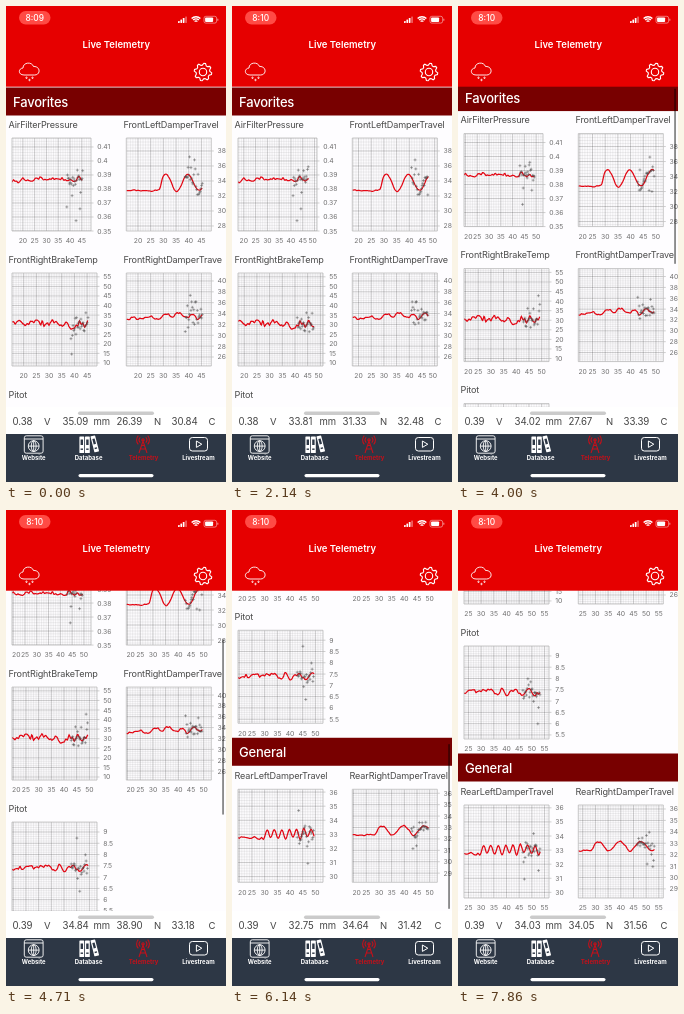
Recreate the animation shown at these times as an HTML page with a canvas. Size 220x476 px, loop 8 s.

```html
<!DOCTYPE html>
<html lang="en">
<head>
<meta charset="utf-8">
<title>Live Telemetry</title>
<style>
  html, body { margin: 0; width: 100%; height: 100%; overflow: hidden; background: #fff; }
  canvas { display: block; width: 220px; height: 476px; }
</style>
</head>
<body>
<canvas id="stage"></canvas>
<script>
const W = 220, H = 476, LOOP = 8000, FPS = 7;
const TOP = 80, SHEET = 401, TABS = 428, MAX_SCROLL = 266, OVERSHOOT = 16;
const BOX_H = 93, SPAN = 33.5, HISTORY = 30, RECENT = 6.8;
const FONT = 'Inter, "Liberation Sans", sans-serif';
const canvas = document.getElementById('stage');
const c = canvas.getContext('2d');
const dpr = window.devicePixelRatio || 1;
canvas.width = W * dpr;
canvas.height = H * dpr;

// amp and period describe the swing after the car starts moving; rough is noise as a share of the range
const charts = [
  { name: 'AirFilterPressure', row: 0, col: 0, w: 79, min: .35, max: .4164, step: .01, base: .3866, rough: .07 },
  { name: 'FrontLeftDamperTravel', row: 0, col: 1, min: 27.33, max: 39.73, step: 2, base: 32.7, amp: 2.2, period: 8.7 },
  { name: 'FrontRightBrakeTemp', row: 1, col: 0, min: 8.4, max: 57, step: 5, base: 31, rough: .15 },
  { name: 'FrontRightDamperTrave', row: 1, col: 1, min: 24.34, max: 41.47, step: 2, base: 33.2, amp: .7, period: 5, rough: .05 },
  { name: 'Pitot', row: 2, col: 0, min: 5.32, max: 9.44, step: .5, base: 7.4, rough: .1 },
  { name: 'RearLeftDamperTravel', row: 3, col: 0, min: 29.6, max: 36.2, step: 1, base: 32.75, amp: .6, period: 2.9, rough: .06 },
  { name: 'RearRightDamperTravel', row: 3, col: 1, min: 28.2, max: 36.35, step: 1, base: 32.35, amp: .8, period: 8.5 }
].map((ch, id) => ({
  amp: 0, period: 1, rough: .025, w: 85, ...ch, id,
  x: ch.col ? 120.3 : 6,
  y: 132 + ch.row * 135 + (ch.row > 2 ? 24 : 0)
}));

const readouts = [
  { unit: 'V', x: 6.5, ux: 38, start: .38, swing: .02 },
  { unit: 'mm', x: 56.5, ux: 87.5, start: 35.09, swing: -3 },
  { unit: 'N', x: 110.5, ux: 148, start: 26.39, swing: 14 },
  { unit: 'C', x: 165.5, ux: 202.5, start: 30.84, swing: 3 }
];

const hash = n => { const v = Math.sin(n * 127.1) * 43758.5453; return v - Math.floor(v); };
const gauss = n => (hash(n) + hash(n + .37) + hash(n + .71) - 1.5) * 2;
const ease = u => { u = Math.min(1, Math.max(0, u)); return u * u * (3 - 2 * u); };

function smoothNoise(x) {
  const i = Math.floor(x);
  return hash(i) + (hash(i + 1) - hash(i)) * ease(x - i) - .5;
}

const scrollAt = t => (MAX_SCROLL + OVERSHOOT) * ease((t - 3.825) / 2.36) - OVERSHOOT * ease((t - 6.19) / .6);

// plots pause while the list is being dragged
const newestAt = t => 45.4 + (t > 4.1 && t < 6.4 ? 4.1 : t);

function text(s, x, y, size, color, { align = 'left', weight = 400, track = 0 } = {}) {
  c.font = `${weight} ${size}px ${FONT}`;
  c.letterSpacing = track + 'px';
  c.textAlign = align;
  c.fillStyle = color;
  c.fillText(s, x, y);
}
function rect(x, y, w, h, color) { c.fillStyle = color; c.fillRect(x, y, w, h); }
function pill(x, y, w, h, r, color) {
  c.beginPath(); c.roundRect(x, y, w, h, r); c.fillStyle = color; c.fill();
}
function stroke(color, width, draw) {
  c.beginPath(); draw(); c.strokeStyle = color; c.lineWidth = width; c.stroke();
}
function line(...p) {
  c.moveTo(p[0], p[1]);
  for (let i = 2; i < p.length; i += 2) c.lineTo(p[i], p[i + 1]);
}
function ring(x, y, r) { c.moveTo(x + r, y); c.arc(x, y, r, 0, 7); }

function curve(ch, x) {
  const swing = ease((x - 28) / 2) * (1 + Math.cos(2 * Math.PI * (x - 31) / ch.period)) / 2;
  const noise = smoothNoise(x * .55 + ch.id * 50) * .7 + smoothNoise(x * 1.5 + ch.id * 90) * .4;
  return ch.base + ch.amp * swing + noise * ch.rough * (ch.max - ch.min);
}

function drawChart(ch, t) {
  const { x: left, y: top, w, min, max, step } = ch;
  const newest = newestAt(t), x0 = newest - HISTORY, x1 = x0 + SPAN;
  const right = left + w, bottom = top + BOX_H;
  const px = v => left + (v - x0) / SPAN * w;
  const py = v => bottom - (v - min) / (max - min) * BOX_H;

  text(ch.name, ch.col ? 117.5 : 2.5, top - 10.5, 9.1, '#4a4a4a', { track: -.15 });
  c.save();
  c.beginPath(); c.rect(left, top, w, BOX_H); c.clip();
  rect(left, top, w, BOX_H, '#fcfbfd');
  const grid = (dx, dy, color) => stroke(color, .6, () => {
    for (let v = Math.ceil(x0 / dx) * dx; v < x1; v += dx) line(px(v), top, px(v), bottom);
    for (let v = Math.ceil(min / dy) * dy; v < max; v += dy) line(left, py(v), right, py(v));
  });
  grid(1, step / 5, 'rgba(0,0,0,.1)');
  grid(5, step, 'rgba(0,0,0,.24)');

  stroke('#e30613', 1.25, () => {
    c.moveTo(left, py(curve(ch, x0)));
    for (let v = Math.ceil(x0 * 4) / 4; v <= newest; v += .25) c.lineTo(px(v), py(curve(ch, v)));
  });
  // raw samples around the smoothed line
  stroke('rgba(75,75,75,.65)', .7, () => {
    for (let k = Math.ceil((newest - RECENT) / .28); k * .28 <= newest; k++) {
      const v = k * .28, g = gauss(k + ch.id * 300);
      const x = px(v), y = py(curve(ch, v)) - g * (.6 + .25 * g * g) * 6;
      line(x - 1.5, y, x + 1.5, y);
      line(x, y - 1.5, x, y + 1.5);
    }
  });
  c.restore();
  stroke('#b0b0b0', .7, () => c.rect(left, top, w, BOX_H));

  for (let v = Math.ceil(x0 / 5) * 5; px(v) < right - 2; v += 5) {
    const x = Math.min(Math.max(px(v), left + 4.3), right - 4.3);
    text(v, x, bottom + 12.3, 6.8, '#707070', { align: 'center' });
  }
  for (let i = Math.ceil(min / step); i * step < max; i++) {
    const y = py(i * step);
    stroke('#b0b0b0', .6, () => line(right, y, right + 2.5, y));
    text(String(+(i * step).toFixed(2)), right + 6.2, y + 2.5, 6.8, '#707070');
  }
}

function section(name, y) {
  rect(0, y, W, 28, '#780000');
  text(name, 7, y + 19.6, 13, '#fff', { weight: 500, track: -.2 });
}

function drawList(t) {
  const s = scrollAt(t), view = SHEET - TOP;
  c.save();
  c.beginPath(); c.rect(0, TOP, W, view); c.clip();
  c.translate(0, -s);
  section('Favorites', 81.5);
  section('General', 509.5);
  for (const ch of charts) drawChart(ch, t);
  c.translate(0, s);
  if (t > 3.9 && t < 6.9) {
    const k = view / (view + MAX_SCROLL), y = TOP + s * k;
    c.globalAlpha = Math.min(1, (6.9 - t) * 3);
    pill(216.2, y, 1.7, Math.min(view * k, SHEET - 2 - y), .8, 'rgba(0,0,0,.5)');
    c.globalAlpha = 1;
  }
  c.restore();
}

function drawCloud() {
  stroke('#fff', .9, () => {
    c.moveTo(18, 69);
    c.bezierCurveTo(12, 69, 12, 62.5, 17, 62);
    c.bezierCurveTo(17, 56, 26, 55.5, 27.5, 60.5);
    c.bezierCurveTo(34.5, 60, 35, 69, 28.5, 69);
    line(18, 69, 28.5, 69);
    ring(20.5, 71.8, .7); ring(26.5, 71.8, .7); ring(23.5, 74, .7);
  });
}

function drawGear(x, y) {
  stroke('#fff', 1.1, () => {
    for (let i = 0; i < 32; i++) {
      const a = (i + .5) / 32 * 2 * Math.PI, r = i % 4 < 2 ? 8.8 : 6.9;
      c.lineTo(x + Math.cos(a) * r, y + Math.sin(a) * r);
    }
    c.closePath();
    ring(x, y, 3.7);
  });
}

function drawHeader(t) {
  rect(0, 0, W, TOP + .7, '#e60000');
  pill(13, 5, 31.5, 13.5, 6.7, '#ff4b45');
  text(t < 2.1 ? '8:09' : '8:10', 28.7, 14.9, 8.4, '#fff', { align: 'center', weight: 500 });
  for (let i = 0; i < 4; i++) {
    const h = 2 + i * 1.5;
    pill(172 + i * 2.4, 17 - h, 1.7, h, .4, i < 3 ? '#fff' : 'rgba(255,255,255,.4)');
  }
  for (let r = 2; r < 7; r += 2.1)
    stroke('#fff', 1.4, () => c.arc(190, 17, r, -Math.PI * .75, -Math.PI * .25));
  stroke('rgba(255,255,255,.65)', .7, () => c.roundRect(198, 10.3, 12.6, 6.8, 1.8));
  pill(199.1, 11.4, 8, 4.6, .9, '#fff');
  pill(211.4, 12.6, .9, 2.2, .4, 'rgba(255,255,255,.65)');
  text('Live Telemetry', 110.3, 42, 9.5, '#fff', { align: 'center', weight: 600 });
  drawCloud();
  drawGear(197, 66);
}

function drawReadouts(n) {
  rect(0, SHEET, W, TABS - SHEET, '#fff');
  pill(72, 405.6, 76, 3.4, 1.7, '#cbcbcb');
  const tick = Math.ceil(n / 2);
  readouts.forEach(({ unit, x, ux, start, swing }, i) => {
    const value = start + (tick && hash(tick + i * 20) * swing);
    text(value.toFixed(2), x, 419, 9.7, '#444', { track: -.1 });
    text(unit, ux, 419, 9.5, '#444');
  });
}

function drawTabs() {
  const white = '#fff', red = '#c4101a', bar = '#2d3745';
  rect(0, TABS, W, H - TABS, bar);

  // browser window with globe
  stroke(white, .9, () => {
    c.roundRect(18.3, 429.8, 18.8, 17.4, 2);
    line(18.3, 433, 37, 433);
    ring(27.7, 440.1, 5.4);
    c.moveTo(30.1, 440.1); c.ellipse(27.7, 440.1, 2.4, 5.4, 0, 0, 7);
    line(22.3, 440.1, 33.1, 440.1);
    line(27.7, 434.7, 27.7, 445.5);
  });

  // books
  for (const [x, tilt] of [[73.4, 0], [79, 0], [84.4, -.25]]) {
    c.save();
    c.translate(x, 430.5);
    c.rotate(tilt);
    pill(0, 0, 4.8, 16.5, .6, white);
    rect(1.2, 3, 2.4, 5.5, bar);
    rect(1.2, 12, 2.4, 1.4, bar);
    c.restore();
  }

  // radio mast
  stroke(red, 1.1, () => {
    line(133, 447, 137, 435, 141, 447);
    line(134.3, 443, 140, 443);
    line(135.4, 439.5, 138.6, 439.5);
    ring(137, 434, 1.2);
  });
  for (const r of [3.8, 6.4]) for (const a of [0, Math.PI])
    stroke(red, 1.1, () => c.arc(137, 434, r, a - .75, a + .75));

  // video
  stroke(white, 1, () => {
    c.roundRect(183.5, 431.5, 18, 13.5, 2.8);
    line(190.4, 435, 195.8, 438.2, 190.4, 441.4, 190.4, 435);
  });

  ['Website', 'Database', 'Telemetry', 'Livestream'].forEach((s, i) =>
    text(s, 27.7 + i * 54.9, 454, 6, i === 2 ? red : white, { align: 'center', weight: 700 }));
  pill(72.5, 468, 75, 3.2, 1.6, '#fff');
}

function frame(now) {
  const n = Math.floor((now % LOOP + 5) * FPS / 1000) % (LOOP * FPS / 1000);
  const t = n / FPS;
  c.setTransform(dpr, 0, 0, dpr, 0, 0);
  rect(0, 0, W, H, '#fefdff');
  drawList(t);
  drawHeader(t);
  drawReadouts(n);
  drawTabs();
}

const start = performance.now();
function loop() {
  frame(performance.now() - start);
  requestAnimationFrame(loop);
}
loop();
</script>
</body>
</html>
```
